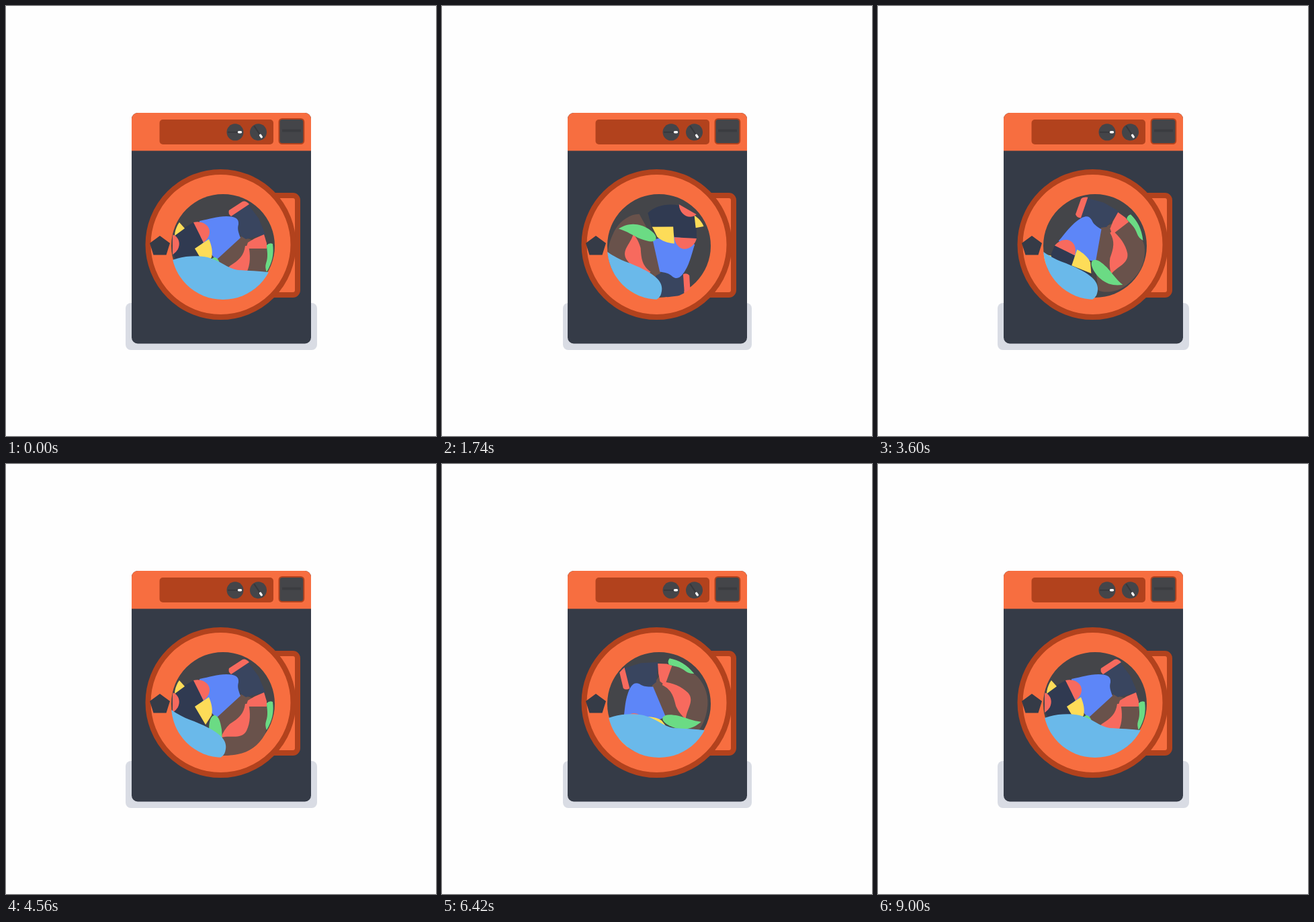
Write an HTML page that moves like this. It is 640x640 px and loops after 9030 ms.

```html
<!DOCTYPE html>
<html lang="en">
<head>
<meta charset="utf-8">
<title>Washing machine</title>
<style>
  html, body { margin: 0; width: 100%; height: 100%; overflow: hidden; background: #fefefe; }
  svg { display: block; width: 100%; height: 100%; }
  .orange { fill: #f76e40; }
  .rust { fill: #b2421d; }
  .edge { stroke: #b2421d; }
  .slate { fill: #353b47; }
  .dark { fill: #444549; }
  .pink { fill: #f76a5e; }
  .yellow { fill: #fddc58; }
  .green { fill: #6bdb84; }
  .blue { fill: #5d86f8; }
  .brown { fill: #69524b; }
  .shirt { fill: #39455f; }
  .pants { fill: #303a51; }
</style>
</head>
<body>
<svg viewBox="0 0 640 640">
  <defs>
    <clipPath id="tub"><circle cx="323" cy="360" r="77"/></clipPath>
    <g id="knob">
      <circle r="12.5" class="dark"/>
      <path d="M-11 0H5" stroke="#37383c" stroke-width="2"/>
      <path d="M5.5 0H8.5" stroke="#fff" stroke-width="3.4" stroke-linecap="round"/>
    </g>
  </defs>

  <rect id="shadow" y="442" height="70" rx="8" fill="#d9dce4"/>

  <g id="machine">
    <rect x="187" y="159" width="267" height="343.5" rx="9" class="slate"/>
    <path class="orange" d="M187 215.500V168a9 9 0 0 1 9-9H445a9 9 0 0 1 9 9V215.500Z"/>
    <rect x="228.500" y="169" width="169.500" height="37" rx="5" class="rust"/>
    <use href="#knob" transform="translate(341 187.800)"/>
    <use href="#knob" transform="translate(375.500 187.800) rotate(56)"/>
    <rect x="406.500" y="168" width="36.800" height="37" rx="4.500" class="dark edge" stroke-width="2"/>
    <path d="M411 185.500H439" stroke="#3b3c40" stroke-width="4"/>

    <rect x="370" y="282" width="64" height="148" rx="7" class="orange edge" stroke-width="8"/>
    <circle cx="319.500" cy="355" r="108" class="orange edge" stroke-width="8"/>
    <path class="slate" d="M229 342L244 353L238.500 370.500H219.500L214 353Z"/>
    <circle cx="323" cy="357" r="77" class="dark"/>

    <g clip-path="url(#tub)">
      <g id="laundry">
        <path class="brown" d="M350 343L372 350L388 360C390 375 390 392 385 403C376 419 362 429 345 432C330 435 315 434 305 428C298 424 293 420 290 414L312 378Z"/>
        <path class="pink" d="M356 357C354 372 347 378 333 387C327 393 323 399 320 407C335 403 350 411 358 397C364 385 364 370 361 357Z"/>
        <path class="shirt" d="M335 313L361 296L376 316L386 340L357 347L346 340Z"/>
        <path class="pink" d="M332 304L352 291Q357 289 362 295L335 313Q330 309 332 304Z"/>
        <path class="pink" d="M384 340L370 346L360 352L357 361L388 361L388 353Z"/>
        <path class="green" d="M388 356Q392 352 397 354C399 368 397 381 388 396Q385 389 387 383C391 372 388 364 388 356Z"/>
        <path class="blue" d="M288 320C303 317 314 313 328 313C342 313 347 317 346 325C344 332 346 337 349 345L313 378L290 352Z"/>
        <path class="pants" d="M249 342L262 332L279 322L294 352L282 361L297 389L282 404C266 399 255 386 249 369Z"/>
        <path class="pink" d="M279 322C297 317 314 335 294 352Z"/>
        <path class="pink" d="M248 340C261 345 261 362 248 370Z"/>
        <path class="yellow" d="M258 322L266 331L251 342C251 335 254 327 258 322Z"/>
        <path class="yellow" d="M281 361L302 347C306 356 308 366 306 374L297 388Z"/>
        <path class="green" d="M311 374C303 374 301 390 303 402C306 417 314 424 324 430C321 418 322 405 321 395C319 382 316 375 311 374Z"/>
      </g>
      <path id="water" fill="#6ab9ea"/>
    </g>
  </g>
</svg>
<script>
  const STEP = 30, STEPS = 301;
  const [shadow, machine, laundry, water] =
    ["shadow", "machine", "laundry", "water"].map(id => document.getElementById(id));

  // Water outline: start point, then four curves
  const calm = [240, 381, 262, 371, 285, 371, 300, 374, 318, 378, 330, 391, 345, 393,
                362, 394, 375, 394, 396, 397, 396, 420, 370, 440, 323, 440];
  const tilted = [240, 361, 252, 371, 265, 378, 280, 383, 292, 388, 306, 394, 316, 402,
                  326, 410, 329, 418, 326, 428, 325, 433, 320, 437, 314, 440];

  const ease = (n, from, to) => {
    const u = Math.min(1, Math.max(0, (n - from) / (to - from)));
    return u * u * (3 - 2 * u);
  };

  function draw(n) {
    const turn = 360 * (ease(n, 0, 150) - ease(n, 180, 300));
    laundry.setAttribute("transform", `rotate(${turn} 322 363)`);

    const tilt = ease(n, 0, 60) - ease(n, 150, 210);
    const p = calm.map((c, i) => (c + (tilted[i] - c) * tilt).toFixed(2));
    water.setAttribute("d", `M${p.slice(0, 2)}C${p.slice(2)}L240 440Z`);

    // Rattle: four steps per cycle
    const phase = n % 4 * Math.PI / 2;
    const inset = 1 - Math.cos(phase);
    shadow.setAttribute("x", 178 + inset);
    shadow.setAttribute("width", 285 - 2 * inset);
    machine.setAttribute("transform", `translate(${(0.5 * Math.sin(phase)).toFixed(2)} 0)`);
  }

  const start = performance.now();
  function tick() {
    draw(Math.floor((performance.now() - start) / STEP) % STEPS);
    requestAnimationFrame(tick);
  }
  tick();
</script>
</body>
</html>
```
